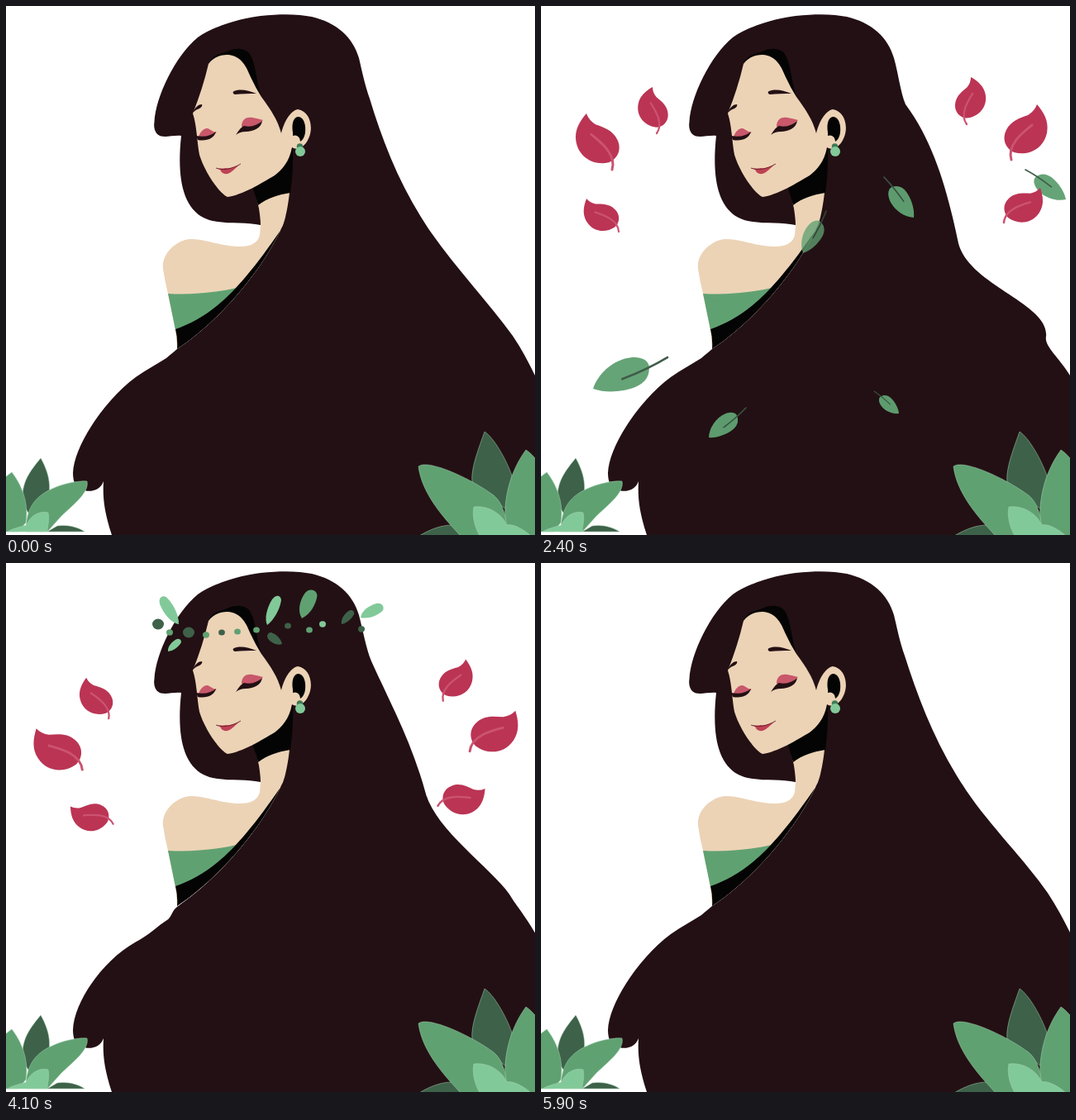
Recreate the animation shown at these times as an HTML page. Size 640x640 px, loop 6000 ms.

```html
<!DOCTYPE html>
<html lang="en">
<head>
<meta charset="utf-8">
<title>Woman with long hair and drifting leaves</title>
<style>
  html, body { margin: 0; height: 100%; overflow: hidden; background: #fff; }
  svg { display: block; width: 100vw; height: 100vh; }
  .hair { fill: #231014; }
  .ink { fill: #040404; }
  .skin { fill: #ecd3b6; }
  .pink { fill: #c8586a; }
  .dark { fill: #3e6149; }
  .mid { fill: #60a172; }
  .light { fill: #82c999; }
  .stem { fill: none; stroke: #395744; stroke-width: 2.7; stroke-linecap: round; }
  .petal { fill: #bb3454; }
  .vein { fill: none; stroke: #cb5370; stroke-width: 4; stroke-linecap: round; }
</style>
</head>
<body>
<svg viewBox="0 0 640 640">
  <path id="hair" class="hair"/>

  <g id="body">
    <path class="skin" d="M299 215L306 245Q308 258 308 265L307 277C304 290 290 293 270 290C250 287 235 281 222 282C205 284 188 300 190 318Q192 332 196 348L205 391L207 415C255 383 308 325 335 265C343 245 346 200 347 170Z"/>
    <path class="mid" d="M196 348C225 350 258 346 279 341L285 338C265 362 240 384 205 392Z"/>
    <path class="ink" d="M205 391C252 375 285 340 333 270L335 265C308 325 255 383 207 415Q208 403 205 391Z"/>
    <path class="ink" d="M298 217L305 241C315 233 330 228 344 226Q348 198 347 168Z"/>
  </g>

  <g id="face">
    <path class="ink" d="M245 70C250 57 262 58 270 54C278 50 290 51 295 58C303 72 302 88 309 110L290 90Z"/>
    <path class="skin" d="M245 70C251 62 259 59 268 59C285 60 291 74 296 86Q302 99 309 110C320 125 329 138 333 154C336 142 343 127 353 125C367 127 372 145 367 158C363 169 354 176 346 171C343 188 334 198 325 205C310 214 285 229 268 231C258 227 240 200 234 180C231 165 231 145 226 130Q238 100 245 70Z"/>
    <path class="ink" d="M347 153C345 138 350 134 354 134C361 135 363 145 362 153C361 160 358 163 356 164C356 158 351 155 347 157Z"/>
    <circle cx="355.500" cy="170" r="3.800" fill="#3f7a56"/>
    <circle class="light" cx="356" cy="176" r="6"/>
    <path class="pink" d="M233 158C236 150 242 146 246 149Q250 152 255 153C248 158 240 159 233 158ZM285 146C285 136 292 134 298 135Q304 136 311 138C303 146 294 148 285 146Z"/>
    <path class="hair" d="M230 157C240 159 248 157 254 152C252 160 243 164 232 162ZM278 156C282 150 284 147 288 145C297 147 304 144 310 139C309 147 300 152 290 152Q283 152 278 156ZM276 103C284 100 293 102 303 106C293 106 285 106 277 107C274 106 274 104 276 103ZM226 129C229 122 233 119 237 119C238 121 236 123 234 124Q230 125 226 129Z"/>
    <path fill="#bf4254" d="M254 196Q260 197 266 196C272 197 278 194 284 191C278 195 273 202 268 203C262 204 260 200 259 198Z"/>
    <path fill="none" stroke="#5a1c26" stroke-width=".8" d="M254 196C262 199 272 198 284 191"/>
  </g>

  <g id="plants" stroke="#a5d3b1" stroke-width=".5">
    <path class="dark" d="M42 547C55 570 56 590 45 610L30 618L20 602C18 575 30 562 42 547Z"/>
    <path class="mid" d="M-1 570L7 564C18 578 28 600 24 625L15 636H-1Z"/>
    <path class="dark" d="M62 629C75 627 88 631 95 636H50Z"/>
    <path class="mid" d="M98 575C101 588 83 602 67 617Q59 626 50 636H24C24 615 30 600 45 590C65 577 90 574 98 575Z"/>
    <path class="light" d="M51 613C53 622 50 630 50 636H2C8 632 18 630 25 628C28 618 40 610 51 613Z"/>
    <path class="dark" d="M579 515C590 522 605 548 612 568L606 610L564 576C562 560 572 535 579 515Z"/>
    <path class="mid" d="M629 537C634 540 638 545 641 548V641H606C600 610 605 570 629 537Z"/>
    <path class="dark" d="M500 641C515 632 528 628 540 628L550 641Z"/>
    <path class="mid" d="M499 557C510 548 560 570 590 592C604 604 606 625 606 641H550C530 620 503 590 499 557Z"/>
    <path class="light" d="M566 606C585 604 600 615 606 628C612 626 625 632 635 641H573C566 628 564 615 566 606Z"/>
  </g>
</svg>
<script>
const svg = document.querySelector('svg');
const clamp = v => Math.max(0, Math.min(1, v));

function add(markup) {
  const g = document.createElementNS('http://www.w3.org/2000/svg', 'g');
  g.innerHTML = markup;
  return svg.appendChild(g);
}

// Maps a 100-unit shape onto the line from the first to the second point.
function along(x1, y1, x2, y2, width = 1) {
  const angle = Math.atan2(y2 - y1, x2 - x1) * 180 / Math.PI;
  const size = Math.hypot(x2 - x1, y2 - y1) / 100;
  return `translate(${x1} ${y1}) rotate(${angle}) scale(${size} ${size * width})`;
}

// Hair: the right and left edges bend between three poses.
const straightLeft = 'C82 533 118 478 157 449C170 440 183 433 194 426C198 422 203 419 207 415';
const straight = {
  right: 'C431 80 434 95 440 112C456 165 478 222 515 275C545 318 585 360 613 399C624 415 632 431 640 447',
  left: straightLeft };
const wavy = {
  right: 'C431 80 437 104 443 118C447 165 488 202 510 265C521 305 546 374 607 402C622 410 631 430 640 448',
  left: 'C82 530 115 485 155 471C175 464 184 446 199 437C204 432 199 422 207 417' };
const full = {
  right: 'C432 80 435 105 441 119C476 166 492 225 505 287C518 338 616 360 611 400C609 412 626 424 640 447',
  left: straightLeft };
const hairKeys = [[0, straight], [1.2, wavy], [2.4, full], [3.5, wavy], [4.6, full], [5.95, straight], [6, straight]];
const hair = document.getElementById('hair');

function mix(a, b, k) {
  const ends = b.match(/\d+/g);
  let i = 0;
  return a.replace(/\d+/g, n => (+n + (ends[i++] - n) * k).toFixed(2) + ' ');
}

function drawHair(t) {
  const i = hairKeys.findIndex(key => key[0] > t) - 1;
  const [t0, a] = hairKeys[i], [t1, b] = hairKeys[i + 1];
  const k = (t - t0) / (t1 - t0);
  hair.setAttribute('d', 'M427 63' + mix(a.right, b.right, k) +
    'L640 640H128C118 610 117 592 118 575C113 590 92 590 84 579Q81 574 81 565' + mix(a.left, b.left, k) +
    'C255 383 308 325 335 265L345 200L308 265C290 261 270 264 250 260C215 252 206 212 212 157' +
    'C200 156 190 161 183 155Q178 150 179.5 140C181 110 205 60 232 38C255 22 290 14 308 12' +
    'C335 9 355 10 370 13C400 20 420 38 427 63Z');
}

// Garland: dots [x, y, radius, colour] and leaves [tip, end, width, colour].
const dots = [
  [184, 74, 7, 'dark'], [198, 84, 4, 'mid'], [221, 84, 7, 'dark'], [242, 87, 4, 'mid'],
  [261, 84, 3.9, 'dark'], [280, 83, 3.9, 'mid'], [303, 81, 3.9, 'mid'], [341, 76, 3.9, 'dark'],
  [367, 81, 3.9, 'mid'], [383, 74, 4, 'light'], [430, 80, 4, 'dark']];
const sprigs = [
  [209, 74, 188, 41, .75, 'light'], [196, 107, 211, 93, .9, 'light'], [316, 75, 330, 40, .72, 'light'],
  [358, 67, 372, 33, 1, 'mid'], [406, 74, 420, 58, .9, 'dark'], [334, 98, 317, 86, 1.05, 'dark'],
  [429, 66, 456, 52, .95, 'light']];
const garland = [
  ...dots.map(([x, y, r, colour]) =>
    ({ x, y, node: add(`<ellipse class="${colour}" cx="${x}" cy="${y}" rx="${r}" ry="${r * .92}"/>`) })),
  ...sprigs.map(([x1, y1, x2, y2, width, colour]) => ({
    x: (x1 + x2) / 2, y: (y1 + y2) / 2,
    node: add(`<path class="${colour}" transform="${along(x1, y1, x2, y2, width)}"
      d="M0 0C14-22 50-30 82-22C106-14 104 12 88 18C60 26 22 20 0 0Z"/>`) }))];

function drawGarland(t) {
  const size = clamp(Math.min((t - 2.38) / 1.22, (5.92 - t) / 1.12));
  for (const { x, y, node } of garland)
    node.setAttribute('transform', `translate(${x} ${y}) scale(${size}) translate(${-x} ${-y})`);
}

// Falling leaves: tip, stem end, the turn and shift of each swing, strength.
const leaves = [
  [63, 463, 153, 425, -12, 7.5, 1.5], [203, 522, 248, 486, -12, 3.5, -3],
  [433, 493, 403, 466, -16, 3, 4], [451, 256, 415, 207, 10, -5, -3],
  [317, 299, 345, 248, -12, 2, -3.5, .8], [635, 234, 586, 198, 12, -3, -7]
].map(([x1, y1, x2, y2, turn, dx, dy, strength = 1]) => ({
  x: (x1 + x2) / 2, y: (y1 + y2) / 2, turn, dx, dy, strength,
  node: add(`<g transform="${along(x1, y1, x2, y2)}">
    <path class="mid" d="M0 0C13-15 34-21 51-19C66-17 76-9 75 0C72 12 63 18.500 49 18.500C33 18 13 12 0 0Z"/>
    <path class="stem" d="M38 3Q72 4 100 0"/></g>`) }));

function drawLeaves(t) {
  const swing = Math.sin(Math.PI * (t - 1.2) / 1.2) ** 2;
  const fall = 59.5 * (t - 2.4);
  const alpha = clamp(1 - Math.abs(t - 2.36) / 1.2);
  for (const { x, y, turn, dx, dy, strength, node } of leaves) {
    node.setAttribute('transform',
      `translate(${dx * swing} ${dy * swing + fall}) rotate(${turn * swing} ${x} ${y})`);
    node.setAttribute('opacity', alpha * strength);
  }
}

// Petals: tip, stem end, fade-in and fade-out start; each side turns about its own pivot.
const sides = [
  { flip: 1, pivot: '214 209', petals: [
    [135, 98, 140, 154, .68, 4.52], [55, 130, 86, 198, .7, 4.575], [55, 233, 94, 273, .92, 4.585]] },
  { flip: -1, pivot: '465 188', petals: [
    [520, 86, 515, 143, .68, 4.52], [600, 119, 569, 186, .7, 4.575], [604, 220, 560, 262, .92, 4.585]] }];
for (const side of sides)
  for (const petal of side.petals) {
    const [x1, y1, x2, y2] = petal;
    petal.node = add(`<g transform="${along(x1, y1, x2, y2, side.flip)}">
      <path class="petal" d="M0 0C7 15 16 29 34 34C60 41 82 24 87 0C88-14 78-28 60-28C42-28 32-16 22-6Q12 1 0 0Z"/>
      <path class="vein" d="M34 7C48 0 80-18 100 0"/></g>`);
  }
const turns = [[0, 50], [.7, 32], [1.2, 17.3], [1.8, 6.2], [2.38, 0], [2.8, 6.5], [3.5, 18.5], [4.6, 28.3], [5.2, 40], [6, 50]];

// Smooth curve through keys of [time, value], flat at peaks.
function curve(keys, t) {
  const i = Math.max(0, keys.findIndex(key => key[0] > t) - 1);
  const rate = j => (keys[j + 1][1] - keys[j][1]) / (keys[j + 1][0] - keys[j][0]);
  const slope = j => {
    if (j === 0) return rate(0);
    if (j === keys.length - 1) return rate(j - 1);
    return rate(j - 1) * rate(j) < 0 ? 0 : (rate(j - 1) + rate(j)) / 2;
  };
  const [t0, a] = keys[i], [t1, b] = keys[i + 1];
  const span = t1 - t0, k = (t - t0) / span, r = 1 - k;
  return a * r * r * (1 + 2 * k) + b * k * k * (3 - 2 * k) + span * k * r * (slope(i) * r - slope(i + 1) * k);
}

function drawPetals(t) {
  const turn = curve(turns, t);
  for (const { flip, pivot, petals } of sides)
    for (const { 4: start, 5: end, node } of petals) {
      node.setAttribute('transform', `rotate(${-flip * turn} ${pivot})`);
      node.setAttribute('opacity', clamp(Math.min(t - start, end + .5 - t) / .5));
    }
}

function draw() {
  const t = performance.now() / 1000 % 6;
  drawHair(t);
  drawGarland(t);
  drawLeaves(t);
  drawPetals(t);
  requestAnimationFrame(draw);
}
draw();
</script>
</body>
</html>
```
